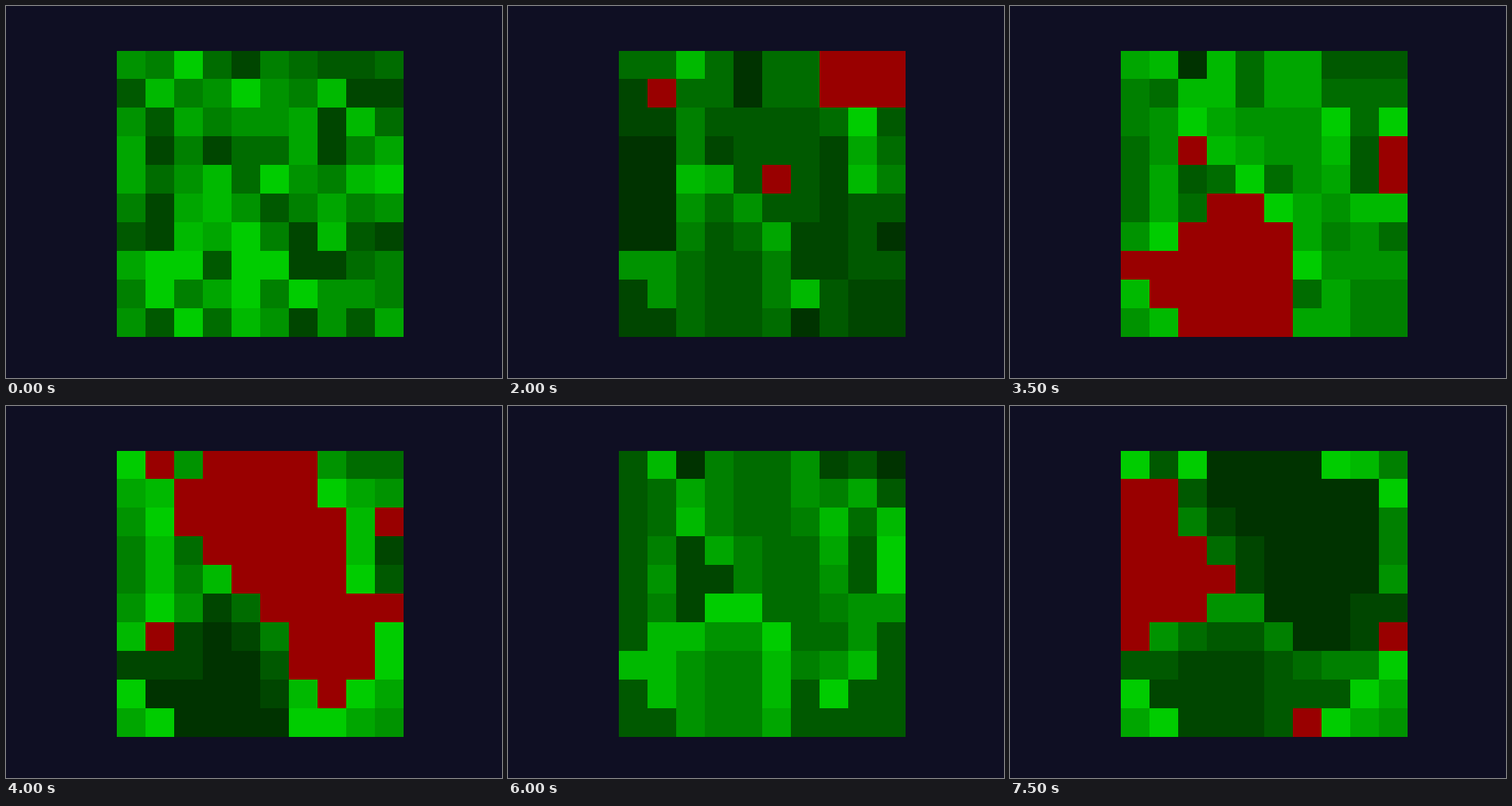
An HTML page for the animation above (8000 ms loop, 640 px wide and 480 px high).

```html
<!DOCTYPE html>
<html lang="en">
<head>
<meta charset="utf-8">
<title>Flashing energy grid</title>
<style>
  html, body { margin: 0; width: 100%; height: 100%; overflow: hidden; background: #0f0f23; }
  svg { display: block; width: 640px; height: 480px; }
</style>
</head>
<body>
<svg id="stage" viewBox="0 0 640 480" shape-rendering="crispEdges"></svg>
<script>
const SIZE = 10, STEP_MS = 500, STEPS = 16;
const LEFT = 143, TOP = 58;
const START = `
5483143223
2745854711
5264556173
6141336146
6357385478
4167524645
2176841721
6882881134
4846848554
5283751526`;

// Every cell gains one; a cell passing 9 flashes once, feeds its neighbours and resets.
function advance(levels) {
  const next = levels.map(v => v + 1);
  const queue = [...next.keys()].filter(i => next[i] > 9);
  while (queue.length) {
    const i = queue.pop(), col = i % SIZE, row = (i - col) / SIZE;
    for (let r = Math.max(0, row - 1); r <= Math.min(SIZE - 1, row + 1); r++) {
      for (let c = Math.max(0, col - 1); c <= Math.min(SIZE - 1, col + 1); c++) {
        const j = r * SIZE + c;
        if (j !== i && ++next[j] === 10) queue.push(j);
      }
    }
  }
  return next.map(v => v > 9 ? 0 : v);
}

const states = [];
let levels = [...START.replace(/\s/g, "")].map(Number);
for (let s = 0; s < STEPS; s++) states.push(levels = advance(levels));

const colour = v => v ? `rgb(0,${Math.round(51 + (v - 1) * 153 / 8)},0)` : "#990000";

const stage = document.getElementById("stage");
const add = attrs => {
  const rect = document.createElementNS("http://www.w3.org/2000/svg", "rect");
  for (const key in attrs) rect.setAttribute(key, attrs[key]);
  return stage.appendChild(rect);
};

add({ x: 0, y: 0, width: 640, height: 480, fill: "#0f0f23" });

const edgeX = c => LEFT + 37 * c;
const edgeY = r => r ? TOP - 1 + 37 * r : TOP;
const cells = levels.map((_, i) => {
  const c = i % SIZE, r = Math.floor(i / SIZE);
  return add({ x: edgeX(c), y: edgeY(r), width: 37, height: edgeY(r + 1) - edgeY(r) });
});

let shown = -1;
function draw(time) {
  const step = Math.floor(time / STEP_MS) % STEPS;
  if (step === shown) return;
  shown = step;
  cells.forEach((cell, i) => cell.setAttribute("fill", colour(states[step][i])));
}

const begin = performance.now();
function tick() {
  draw(performance.now() - begin);
  requestAnimationFrame(tick);
}
tick();
</script>
</body>
</html>
```
